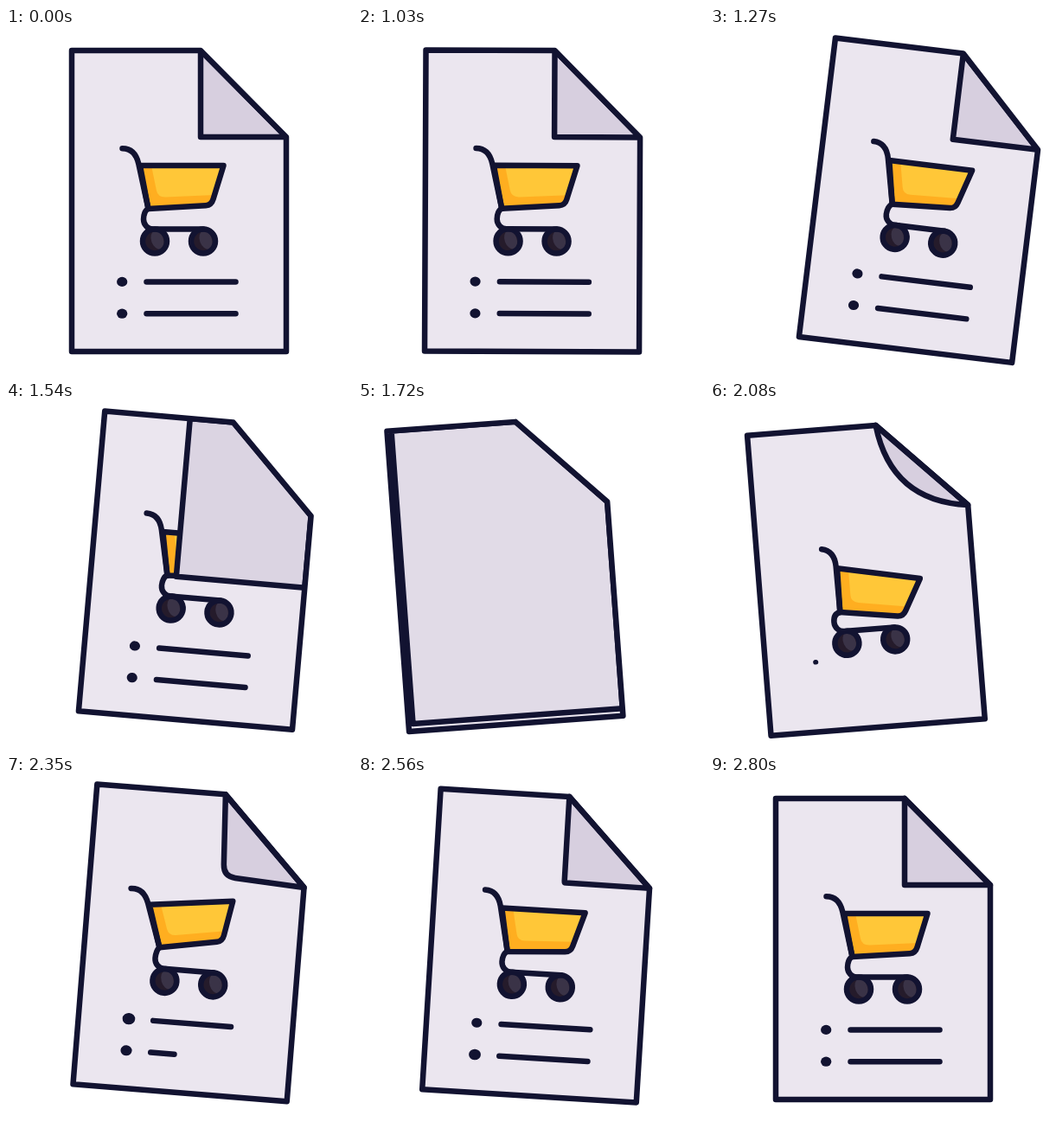
Recreate the animation shown at these times as an HTML page with a canvas. Size 400 px wide and 400 px high, loop 2.83 s.

```html
<!DOCTYPE html>
<html lang="en">
<head>
<meta charset="utf-8">
<title>Shopping list</title>
<style>
html, body { margin: 0; width: 100%; height: 100%; overflow: hidden; background: #fff; }
canvas { display: block; width: 100vw; height: 100vh; }
</style>
</head>
<body>
<canvas id="stage"></canvas>
<script>
const LOOP = 2830, START = 1030, STEP = 30;
const INK = '#121331', PAPER = [235, 230, 239], BACK = [215, 207, 223];
const canvas = document.getElementById('stage');
const ctx = canvas.getContext('2d');
const TURNED = 1760;

// Keys are [time, value] pairs, eased between neighbours.
const keys = {
  x: [[990, 0], [1365, 56], [1803, -39], [1872, -39], [2391, 16], [2750, 0]],
  y: [[990, 0], [1380, -1], [1560, -5.5], [1900, 2.7], [2080, 2.5], [2380, -7.5], [2750, 0]],
  angle: [[990, 0], [1396, 9], [1837, -7], [1940, -7], [2431, 5.5], [2750, 0]],
  turn: [[1400, 0], [TURNED, 1]],
  fold: [[1880, 0], [2100, 0.8], [2620, 1]],
  round: [[2080, 1], [2380, 0.12], [2620, 0]],
  rise: [[1780, 150], [2194, 0]],
  tilt: [[1960, 20], [2290, -8], [2560, 0]],
  dot: [[0, 0], [100, 1], [270, 1.22], [320, 1.2], [480, 1]],
  line: [[0, 0], [340, 1]]
};

const mix = (a, b, p) => a + (b - a) * p;
const mixPoint = (a, b, p) => [mix(a[0], b[0], p), mix(a[1], b[1], p)];
const clamp = v => Math.min(1, Math.max(0, v));
const rad = deg => deg * Math.PI / 180;
const rgb = (a, b, p) => `rgb(${a.map((v, i) => Math.round(mix(v, b[i], p)))})`;

function at(name, t) {
  const list = keys[name];
  if (t <= list[0][0]) return list[0][1];
  for (let i = 1; i < list.length; i++) {
    const [t0, v0] = list[i - 1], [t1, v1] = list[i];
    if (t < t1) {
      const s = (t - t0) / (t1 - t0);
      return mix(v0, v1, s * s * (3 - 2 * s));
    }
  }
  return list[list.length - 1][1];
}

function draw(path, fill, stroke = true) {
  if (typeof path === 'string') path = new Path2D(path);
  if (fill) {
    ctx.fillStyle = fill;
    ctx.fill(path);
  }
  if (stroke) ctx.stroke(path);
}

const page = new Path2D('M76 26H225L324 126V374H76Z');
const handle = new Path2D('M134.5 139.3C146 139.3 151 147 153.3 157L164.5 209');
const basket = new Path2D('M155 159H251.5L239.5 198Q237.5 204.7 231 205.2L164.5 209Z');
const shine = new Path2D('M168 159H251.5L241 193L184 195.5Q175.5 195.5 174 188Z');

function wheel(x) {
  const y = 246.5;
  const rim = new Path2D(), glow = new Path2D();
  rim.arc(x, y, 14, 0, 7);
  glow.ellipse(x + 3, y - 1.5, 7, 11, rad(-20), 0, 7);
  draw(rim, '#251b2b', false);
  draw(glow, '#3a3347', false);
  draw(rim);
}

function cart(rise, tilt) {
  const a = rad(tilt), px = 160, py = 221;
  const jx = px + 4.5 * Math.cos(a) + 12 * Math.sin(a);
  const jy = py + 4.5 * Math.sin(a) - 12 * Math.cos(a);
  ctx.save();
  ctx.translate(0, rise);
  wheel(172);
  wheel(228);
  draw(`M${jx} ${jy}C161 ${jy + 1} 159 216 159 221C159 227.5 164 232.5 170 232.5H228`);
  ctx.translate(px, py);
  ctx.rotate(a);
  ctx.translate(-px, -py);
  draw(basket, '#ffae20', false);
  draw(shine, '#ffc738', false);
  draw(basket);
  draw(handle);
  ctx.restore();
}

function row(y, dot, line) {
  if (dot > 0) {
    const p = new Path2D();
    p.ellipse(134.2, y, 6.1 * dot, 5.6 * dot, 0, 0, 7);
    draw(p, INK, false);
  }
  if (line > 0) draw(`M162.5 ${y}h${103 * line}`);
}

function content(t) {
  const fresh = t >= TURNED;
  for (let i = 0; i < 2; i++) {
    const delay = i * 150;
    row(293.4 + i * 36.8,
      fresh ? at('dot', t - 2030 - delay) : 1,
      fresh ? at('line', t - 2085 - delay) : 1);
  }
  if (!fresh) cart(0, 0);
  else if (t > 1780) cart(at('rise', t), at('tilt', t));
}

// The corner flap sweeps over the sheet and becomes its new face.
function flap(t, tint) {
  const [x, y] = mixPoint([225, 126], [76, 374], at('turn', t));
  draw(`M${x} 26H225L324 126V${y}H${x}Z`, tint);
}

function newFold(t) {
  const k = at('fold', t), r = at('round', t);
  if (k <= 0) return;
  const a = [225, 26], b = [324, 126];
  const tip = mixPoint([274.5, 76], [225, 126], k);
  const from = mixPoint(tip, a, r), to = mixPoint(tip, b, r);
  draw(`M${a}L${from}Q${tip} ${to}L${b}Z`, rgb(BACK, BACK, 0));
}

function render(t) {
  const w = innerWidth, h = innerHeight, dpr = devicePixelRatio || 1;
  const pw = Math.round(w * dpr), ph = Math.round(h * dpr);
  if (canvas.width !== pw || canvas.height !== ph) {
    canvas.width = pw;
    canvas.height = ph;
  }
  ctx.setTransform(pw / 400, 0, 0, ph / 400, 0, 0);
  ctx.fillStyle = '#fff';
  ctx.fillRect(0, 0, 400, 400);
  ctx.strokeStyle = INK;
  ctx.lineWidth = 6.5;
  ctx.lineCap = ctx.lineJoin = 'round';

  ctx.translate(200 + at('x', t), 200 + at('y', t));
  ctx.rotate(rad(at('angle', t)));
  ctx.translate(-200, -200);

  const tint = rgb(BACK, PAPER, clamp((t - 1420) / 600));
  const fresh = t >= TURNED;
  draw(page, fresh ? tint : rgb(PAPER, PAPER, 0), false);
  ctx.save();
  ctx.clip(page);
  content(t);
  if (!fresh) flap(t, tint);
  ctx.restore();
  if (fresh) newFold(t);
  draw(page);
}

const origin = performance.now();
function tick() {
  const t = (performance.now() - origin) % LOOP;
  render(t < START ? 0 : t - (t - START) % STEP);
  requestAnimationFrame(tick);
}
tick();
</script>
</body>
</html>
```
